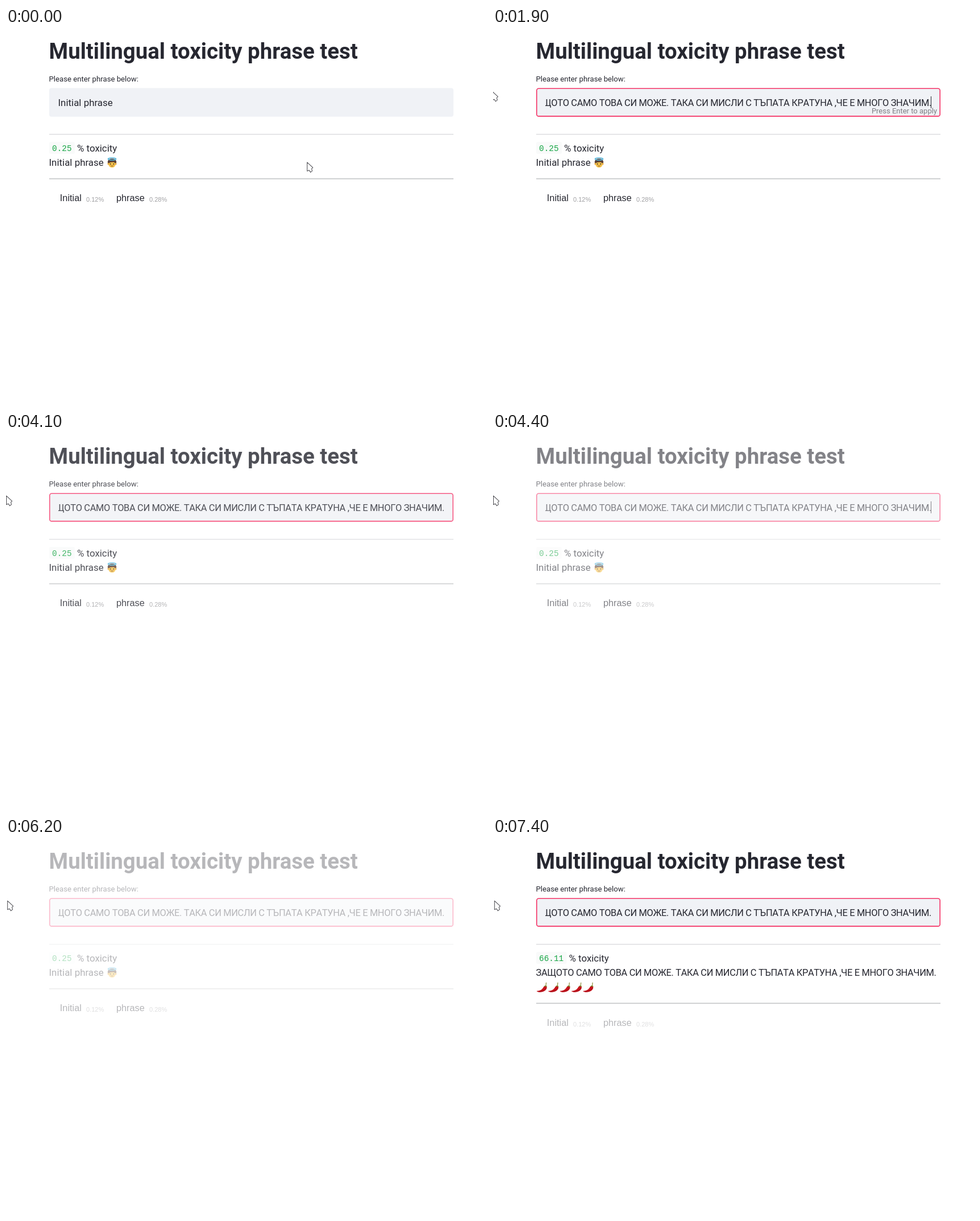
An HTML page for the animation above (8 s loop, 846x662 px).

```html
<!DOCTYPE html>
<html lang="en">
<head>
<meta charset="utf-8">
<title>Toxicity phrase test</title>
<style>
  html, body { margin: 0; width: 100%; height: 100%; overflow: hidden; background: #fff; }
  svg { display: block; width: 846px; height: 662px; }
  text { font: 16.9px Roboto, sans-serif; fill: #262730; white-space: pre; }
  #title { font-size: 38.4px; font-weight: 700; }
  .label { font-size: 13.2px; }
  .hint { font-size: 13px; fill: #7d7d83; text-anchor: end; }
  .phrase { font-size: 16.4px; letter-spacing: -0.33px; font-kerning: none; }
  .code { font: 14.4px "Liberation Mono", monospace; fill: #18a646; }
  .word { font: 16.3px "Liberation Sans", sans-serif; }
  .score { font: 11px "Liberation Sans", sans-serif; fill: #a0a0a3; }
</style>
</head>
<body>
<svg viewBox="0 0 846 662">
  <defs>
    <clipPath id="field"><rect x="92" y="110" width="679.5" height="42"/></clipPath>
    <clipPath id="picked"><rect class="sel" y="120" height="21"/></clipPath>
    <g id="chili">
      <path d="M.6 15.6C6 15.6 10.500 13 12.600 8.300C14 6.300 17.800 6.500 18.300 9C18.300 15.500 8.500 20 .6 16.500Z" fill="#c8131b"/>
      <path d="M3 16.700C9 17.300 15 14 17 10" fill="none" stroke="#9c0d18"/>
      <path d="M14 7.600Q16.200 5.800 18 8" fill="none" stroke="#6f8426" stroke-width="1.500"/>
      <path d="M16.200 7C17.200 4.800 16.300 2.800 17.300 .9" fill="none" stroke="#8b8b35" stroke-width="1.200"/>
    </g>
  </defs>

  <g id="top">
    <text id="title" x="75.500" y="53.500">Multilingual toxicity phrase test</text>
    <text class="label" x="75.500" y="93.800">Please enter phrase below:</text>
    <rect x="76" y="105.500" width="711" height="50.200" rx="4" fill="#f0f2f6"/>
    <rect id="focus" x="76.800" y="106.300" width="709.400" height="48.600" rx="3.500" fill="none" stroke="#f63366" stroke-width="1.600"/>
    <g id="before">
      <text x="91.500" y="136.500">Initial phrase</text>
      <g clip-path="url(#picked)">
        <rect x="92" y="120" width="97" height="21" fill="#338fff"/>
        <text x="91.500" y="136.500" style="fill:#fff">Initial phrase</text>
      </g>
    </g>
    <g id="after">
      <g clip-path="url(#field)"><text class="phrase" x="771" y="136.500" text-anchor="end"></text></g>
      <text id="hint" class="hint" x="781" y="149.500">Press Enter to apply</text>
      <rect id="caret" x="770" y="120" width="1" height="21" fill="#262730"/>
    </g>
    <rect x="76" y="186" width="711" height="1.200" fill="#d5d6d9"/>
  </g>

  <g id="rows">
    <rect id="chip" x="76" y="200" height="21" rx="3" fill="#f9fafa"/>
    <text id="value" class="code" x="81" y="216"></text>
    <text id="unit" y="216.500">% toxicity</text>
    <g id="calm">
      <text x="75.500" y="242">Initial phrase</text>
      <g transform="translate(177.500 227)">
        <rect x="1.300" y="2.500" width="15.400" height="12" rx="6" fill="#5b4036"/>
        <rect x="1" y="9.500" width="16" height="4" rx="2" fill="#e0a23a"/>
        <path d="M2.800 8.500H15.200V12Q14.500 18 9 18T2.800 12Z" fill="#f6c24a"/>
        <path d="M2.600 10.500V6.500H15.400V10.500Q13 9.800 11.500 8Q7 8.200 2.600 10.500Z" fill="#5b4036"/>
        <circle cx="6.200" cy="11.800" r="1" fill="#3b302c"/>
        <circle cx="11.800" cy="11.800" r="1" fill="#3b302c"/>
        <path d="M6.800 14.800Q9 16.400 11.200 14.800" fill="none" stroke="#7a4a2b"/>
        <ellipse cx="9" cy="3" rx="7" ry="2" fill="none" stroke="#55b6dc" stroke-width="1.700"/>
      </g>
    </g>
    <g id="hot">
      <text class="phrase" x="75.500" y="242"></text>
      <g id="chilies"></g>
    </g>
    <rect id="rule" x="76" y="263.800" width="711" height="1.800" fill="#c9cacc"/>
  </g>

  <g id="words">
    <text class="word" x="94.800" y="304">Initial</text>
    <text class="score" x="141" y="305">0.12%</text>
    <text class="word" x="194" y="304">phrase</text>
    <text class="score" x="252" y="305">0.28%</text>
  </g>

  <path id="pointer" d="M.7 .8V16.300L4 14.700L6.700 18.300L9.600 15.800L8.500 12.200L10.700 10.200Z" fill="#fff" stroke="#55555a" stroke-width="1.100" stroke-linejoin="round"/>
</svg>
<script>
const LOOP = 8000, STEP = 100;
const PASTE = 1900, APPLY = 3000, FADE = 3630, RERUN = 6600, RESULT = 7400;
const PHRASE = "ЗАЩОТО САМО ТОВА СИ МОЖЕ. ТАКА СИ МИСЛИ С ТЪПАТА КРАТУНА ,ЧЕ Е МНОГО ЗНАЧИМ.";
const blinks = [PASTE, 2600, 3200, 3700, 4400, 5000, 5600, 6200, 6800, 7400];
// time, x, y of the pointer
const path = [[100, 529, 235], [800, 205, 138], [1000, -4, 115], [1100, -4, 111],
  [1300, -4, 111], [1500, -2, 110.5], [3100, -2, 110.5], [3200, 0, 109.5],
  [5400, 0, 109.5], [5600, 2, 109.5], [LOOP, 2, 109.5]];

const $ = id => document.getElementById(id);
const clamp = (v, lo, hi) => Math.min(hi, Math.max(lo, v));
const show = (id, on) => $(id).setAttribute("display", on ? "inline" : "none");
const set = (id, name, value) => $(id).setAttribute(name, value);
const sel = document.querySelector(".sel");

document.querySelectorAll(".phrase").forEach(e => e.textContent = PHRASE);
$("chilies").innerHTML = [0, 1, 2, 3, 4]
  .map(i => `<use href="#chili" x="${76.5 + i * 20.4}" y="253"/>`).join("");

function pointerAt(t) {
  if (t <= path[0][0]) return path[0].slice(1);
  const i = path.findIndex(p => p[0] >= t);
  const a = path[i - 1], b = path[i], k = (t - a[0]) / (b[0] - a[0]);
  return [a[1] + (b[1] - a[1]) * k, a[2] + (b[2] - a[2]) * k];
}

function draw(t) {
  const [x, y] = pointerAt(t);
  set("pointer", "transform", `translate(${x} ${y})`);

  const left = t < 800 ? 189 : clamp(x, 92, 189);
  sel.setAttribute("x", left);
  sel.setAttribute("width", 189 - left);
  set("focus", "opacity", clamp((t - 700) / 200, 0, 1));
  show("before", t < PASTE);
  show("after", t >= PASTE);
  show("hint", t < APPLY);
  show("caret", blinks.filter(b => b <= t).length % 2);

  const stale = 1 - 0.67 * clamp((t - FADE) / 1000, 0, 1) ** 1.67;
  const done = t >= RESULT;
  set("top", "opacity", t < RERUN ? stale : 1);
  set("rows", "opacity", done ? 1 : stale);
  set("words", "opacity", stale);

  show("calm", !done);
  show("hot", done);
  $("value").textContent = done ? "66.11" : "0.25";
  set("chip", "width", done ? 53.5 : 45);
  set("unit", "x", done ? 133.5 : 125);
  const shift = `translate(0 ${done ? 25.6 : 0})`;
  set("rule", "transform", shift);
  set("words", "transform", shift);
}

const start = performance.now();
function tick() {
  const t = (performance.now() - start) % LOOP;
  draw(Math.floor(t / STEP) * STEP);
  requestAnimationFrame(tick);
}
tick();
</script>
</body>
</html>
```
